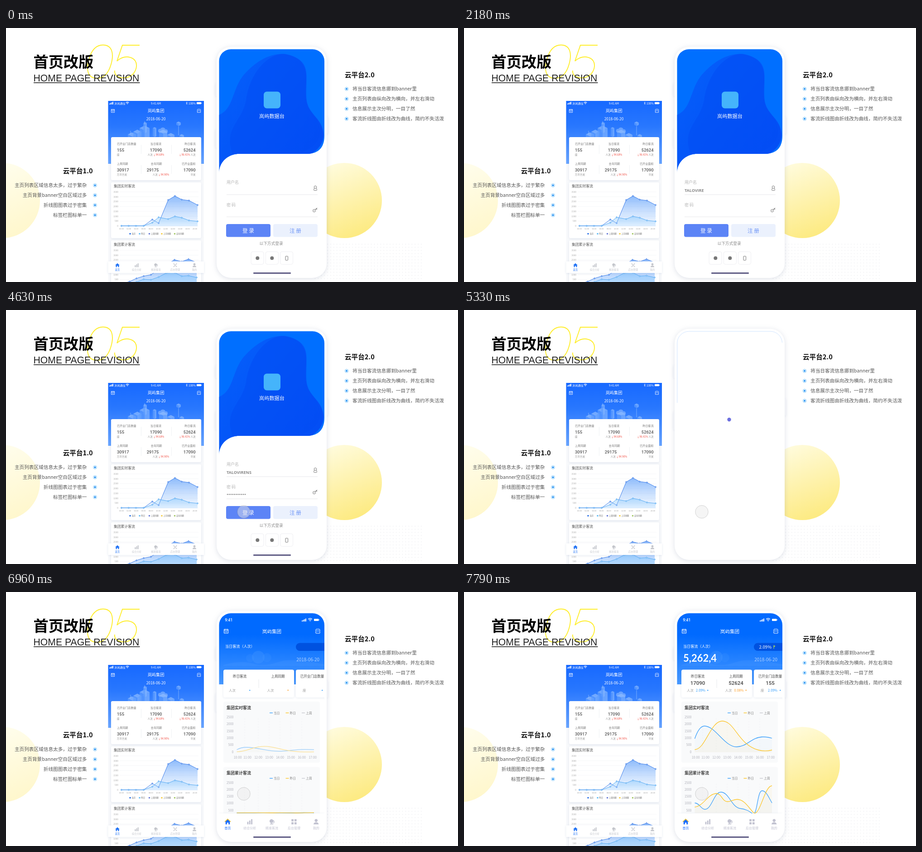
An HTML page that plays this animation: 998x561 px, repeating every 7990 ms.

```html
<!DOCTYPE html>
<html lang="zh">
<head>
<meta charset="utf-8">
<style>
html, body { margin: 0; width: 100%; height: 100%; overflow: hidden; background: #fff; }
svg { display: block; width: 100vw; height: 100vh; }
text { font-family: "Noto Sans CJK SC", "Noto Sans CJK", "Noto Sans", sans-serif; white-space: pre; text-spacing-trim: space-all; }
text[font-weight="500"] { font-family: Roboto, "Noto Sans CJK SC", sans-serif; }
.shade { filter: drop-shadow(0 1px 2.5px rgba(60, 90, 150, .12)); }
.grow path { vector-effect: non-scaling-stroke; }
</style>
</head>
<body>
<svg id="stage" viewBox="0 0 998 561" preserveAspectRatio="none">
<defs>
  <linearGradient id="sun" x1=".25" y1="0" x2=".65" y2="1"><stop stop-color="#fffce0"/><stop offset="1" stop-color="#fdea80"/></linearGradient>
  <linearGradient id="paleSun" x1=".25" y1="0" x2=".65" y2="1"><stop stop-color="#fffef0"/><stop offset="1" stop-color="#fff7cc"/></linearGradient>
  <linearGradient id="oldTop" x2="0" y2="1"><stop stop-color="#1769ff"/><stop offset=".4" stop-color="#2877fe"/><stop offset="1" stop-color="#69a5ff"/></linearGradient>
  <linearGradient id="newTop" x2="0" y2="1"><stop offset=".3" stop-color="#006aff"/><stop offset="1" stop-color="#4798ff"/></linearGradient>
  <linearGradient id="blob" x2="1" y2="1"><stop stop-color="#0560fb"/><stop offset="1" stop-color="#034bf4"/></linearGradient>
  <linearGradient id="area" x2="0" y2="1"><stop stop-color="#3f8cf8" stop-opacity=".6"/><stop offset="1" stop-color="#8fc0ff" stop-opacity=".12"/></linearGradient>
  <linearGradient id="area2" x2="0" y2="1"><stop stop-color="#6cbcfb" stop-opacity=".4"/><stop offset="1" stop-color="#b5dcff" stop-opacity=".3"/></linearGradient>
  <pattern id="dots" x="679" y="474" width="6.9" height="6.9" patternUnits="userSpaceOnUse"><circle cx="3.4" cy="3.4" r=".75" fill="#e2e3e8"/></pattern>
  <clipPath id="screen"><rect x="470.5" y="47" width="232.5" height="497" rx="26"/></clipPath>
  <clipPath id="blueShape"><path d="M470 47H703V238Q703 278 663 278H515C490 278 470.500 296 470.500 320Z"/></clipPath>
  <clipPath id="plot"><rect x="470" y="380" width="233" height="109"/></clipPath>
</defs>
</svg>
<script>
const stage = document.getElementById('stage');

// y is the middle of the line
const text = (x, y, s, size, fill = '#333', anchor = 'start', weight = 400, extra = '') =>
  `<text x="${x}" y="${y + size * .37}" font-size="${size}" fill="${fill}" text-anchor="${anchor}" font-weight="${weight}" ${extra}>${s}</text>`;
const mid = (x, y, s, size, fill, weight) => text(x, y, s, size, fill, 'middle', weight);
const end = (x, y, s, size, fill, weight) => text(x, y, s, size, fill, 'end', weight);
const rect = (x, y, w, h, fill, r = 0, extra = '') =>
  `<rect x="${x}" y="${y}" width="${w}" height="${h}" rx="${r}" fill="${fill}" ${extra}/>`;
const circle = (x, y, r, fill, extra = '') => `<circle cx="${x}" cy="${y}" r="${r}" fill="${fill}" ${extra}/>`;
const line = (d, color, w = 1, extra = '') => `<path d="${d}" fill="none" stroke="${color}" stroke-width="${w}" ${extra}/>`;
const fill = (d, color, extra = '') => `<path d="${d}" fill="${color}" ${extra}/>`;
const at = (x, y, s, body) => `<g transform="translate(${x} ${y}) scale(${s})">${body}</g>`;
const each = (list, f) => list.map(f).join('');

const bullet = (x, y) => circle(x, y, 3.8, '#f2faff', 'stroke="#7cc4f8" stroke-width=".9"') + circle(x, y, 2, '#2490f2');
const calendar = (x, y, s) => at(x, y, s, line('M-4.500-4H4.500V4.500H-4.500ZM-4.500-1.500H4.500M-2.500 1.500H2.500M-2.500-5V-3M2.500-5V-3', '#fff'));
const shop = (x, y, s) => at(x, y, s, line('M-3.500-4.500H3.500L5-1.500Q3.300 1 1.700-1Q0 1-1.700-1Q-3.300 1-5-1.500ZM-4.500 0V4.500H4.500V0', '#fff'));
const status = (x, y, s) => at(x, y, s, each([0, 1, 2, 3], i => rect(i * 3, 1 - i * 1.6, 2, 2.5 + i * 1.6, '#fff')));
const wifi = (x, y, s) => at(x, y, s, line('M-4.500-1.500Q0-5.500 4.500-1.500M-2.700.6Q0-1.900 2.700.6', '#fff', 1.4) + circle(0, 2.3, 1, '#fff'));
const battery = (x, y, s) => at(x, y, s, rect(0, -2.5, 11, 5, '#fff', 1) + rect(11.5, -1, 1, 2, '#fff'));

const tabNames = ['首页', '综合分析', '精准客流', '后台管理', '我的'];
const tabIcons = [
  'M-7 0L0-6.500L7 0H5V6H1.800V2H-1.800V6H-5V0Z',
  'M-6 0h3v6h-3zM-1.500-3h3v9h-3zM3-6h3v12h-3z',
  'M-1-6a4.500 4.500 0 1 0 .1 0zM-5 6Q-1 1 4 6ZM4-4Q8 0 4 4L3 3Q6 0 3-3Z',
  'M-6-6h5v5h-5zM1-6h5v5h-5zM-6 1h5v5h-5zM1 1h5v5h-5z',
  'M0-6.500a3.500 3.500 0 1 0 .1 0zM-6 6Q-5.500 1 0 1Q5.500 1 6 6Z'];
const crossTools = 'M-6-5l1.500-1.500L6 4.500L4.500 6ZM6-5L4.500-6.500L-6 4.500L-4.500 6Z';
const tabs = (x, step, y, s, labelY, size, active, idle, icons) => each(tabNames, (name, i) =>
  at(x + i * step, y, s, fill(icons[i], i ? idle : active)) +
  mid(x + i * step, labelY, name, size, i ? idle : active));

// ---------- backdrop ----------
const backdrop =
  circle(747, 381, 83, 'url(#sun)') + circle(-8, 381, 83, 'url(#paleSun)') +
  rect(679, 474, 244, 85, 'url(#dots)') +
  line('M214 37.500C234 37.500 239 56 232 80C226 101 215 111 201 111C181 111 176 94 183 69C189 48 199 37.500 214 37.500ZM295 38H257L245 73C252 66 262 63 270 64C284 66 291 76 287 90C283 104 270 111 257 110C246 109 239 103 240 94', '#ffee2e', 1.9) +
  text(60.5, 74.5, '首页改版', 33.2, '#000', 'start', 700) +
  `<text x="60.500" y="117.500" font-size="21.200" fill="#222" style="font-family:'Liberation Sans',sans-serif">HOME PAGE REVISION</text>` +
  rect(61, 120, 234.5, 1.6, '#222') +
  text(748, 103.5, '云平台2.0', 14.6, '#111', 'start', 700) +
  each(['将当日客流信息挪到banner里', '主页列表由纵向改为横向，并左右滑动', '信息展示主次分明，一目了然', '客流折线图由折线改为曲线，简约不失活泼'],
    (s, i) => bullet(752, 134.5 + i * 22) + text(765, 134.5 + i * 22, s, 10.65, '#555')) +
  end(191.5, 316, '云平台1.0', 14.6, '#111', 700) +
  each(['主页列表区域信息太多，过于繁杂', '主页背景banner空白区域过多', '折线图图表过于密集', '标签栏图标单一'],
    (s, i) => bullet(196.5, 347.5 + i * 21.9) + end(178.5, 347.5 + i * 21.9, s, 10.65, '#555'));

// ---------- old home page ----------
const block = ([x, y, w, h]) =>
  fill(`M${x} ${y}l${w} ${-w / 2}l${w} ${w / 2}l${-w} ${w / 2}z`, '#9cc6ff', 'opacity=".6"') +
  fill(`M${x} ${y}l${w} ${w / 2}v${h}l${-w} ${-w / 2}z`, '#5d9dff', 'opacity=".7"') +
  fill(`M${x + w} ${y + w / 2}l${w} ${-w / 2}v${h}l${-w} ${w / 2}z`, '#7eb2ff', 'opacity=".7"');
const stat = (x, y, anchor, label, n, unit, pct = '') =>
  text(x, y, label, 6.1, '#777', anchor) + text(x, y + 14, n, 9.4, '#555', anchor, 500) +
  text(x, y + 24, unit + (pct && ` <tspan fill="#f04a3e">↓${pct}</tspan>`), 5.5, '#888', anchor);
const series = (xs, ys, color, floor, area) => {
  const d = 'M' + xs.map((x, i) => x + ' ' + ys[i]).join('L');
  return fill(`${d}V${floor}H${xs[0]}Z`, `url(#${area})`) + line(d, color, .9) +
    each(xs, (x, i) => circle(x, ys[i], 1.3, '#fff', `stroke="${color}"`));
};
const xs = [255, 271, 287, 304, 323, 337, 358, 373, 388, 404, 423];
const oldGrid = y0 => each([3500, 3000, 2500, 2000, 1500, 1000, 500, 0], (n, i) =>
  end(248, y0 + i * 10.75, n, 4.8, '#aaa') + line(`M251 ${y0 + i * 10.75}H425`, '#eceef2', .5));
const oldHome =
  rect(225.5, 161, 211.5, 400, '#f8f9fb') + rect(225.5, 161, 211.5, 139, 'url(#oldTop)') +
  each([[269, 235, 9, 12], [281, 229, 9, 14], [295, 221, 11, 22], [303, 210, 4, 20], [324, 221, 4, 18], [338, 229, 9, 12], [356, 236, 8, 9], [383, 237, 5, 6], [376, 209, 5, 5]], block) +
  fill('M339 231a4 4 0 0 1 2-8a6 6 0 0 1 11 1a4 4 0 0 1 2 8z', '#8fbdff', 'opacity=".6"') +
  line('M381 217V237M275 227V235M306 206V214', '#9cc6ff', .7) +
  status(228, 166, .8) + text(239, 166.5, '沐岚通信', 6.2, '#fff') + wifi(268, 166, .75) +
  mid(331, 166.5, '9:41 AM', 6.2, '#fff') + line('M397.500 164.500l3 3l-1.500 1.500v-6l1.500 1.500l-3 3', '#fff', .6) +
  end(419, 166.5, '100%', 6.2, '#fff') + battery(421, 166, .9) +
  calendar(236, 183, .8) + shop(426, 183, .8) + mid(331, 183, '岚屿集团', 9.2, '#fff') +
  mid(331, 200.5, '2018-06-20', 8.3, '#fff') +
  rect(232, 241, 199, 95, '#fff', 3, 'class="shade"') +
  stat(245, 255.5, 'start', '已开业门店数量', '155', '座') + stat(331, 255.5, 'middle', '当日客流', '17090', '人次', '94.68%') +
  stat(418.5, 255.5, 'end', '昨日客流', '52624', '<tspan fill="#f04a3e">↓96.41%</tspan> 人次') +
  stat(245, 300, 'start', '上周同期', '30917', '万平方米') +
  mid(332, 300, '去年同期', 6.1, '#777') + mid(324, 314, '29175', 9.4, '#555', 500) +
  mid(342, 324, '人次 <tspan fill="#f04a3e">↓94.90%</tspan>', 5.5, '#888') +
  stat(418.5, 300, 'end', '已开业面积', '17090', '平米') +
  line('M298.500 258V278M365.500 258V278M298.500 303V322M365.500 303V322', '#e9ebef', .7) +
  rect(232, 341, 199, 123, '#fff', 3, 'class="shade"') + text(238, 349.5, '集团实时客流', 7.8, '#555') + oldGrid(362) +
  series(xs, [437, 437, 437, 437, 423, 431, 380, 371, 379, 381, 391], '#2f74e8', 438, 'area') +
  series(xs, [437, 437, 437, 437, 430, 418, 422, 416, 419, 425, 427], '#4ea6f2', 438, 'area2') +
  each(xs, (x, i) => mid(255 + i * 16.2, 443.5, String(i * 2).padStart(2, '0') + ':00', 4, '#999')) +
  each([[274, '当月', '#2f74e8'], [295, '昨日', '#63bdf5'], [316.5, '上周同期', '#6c7fd8'], [344, '上月同期', '#f6cf4a'], [372.5, '去年同期', '#a6c96a']],
    ([x, s, c]) => circle(x, 454.5, 1.8, c) + text(x + 3.5, 454.5, s, 4.2, '#666')) +
  rect(232, 469, 199, 95, '#fff', 3, 'class="shade"') + text(238, 478.5, '集团累计客流', 7.8, '#555') + oldGrid(491) +
  series([250, 273, 288, 304, 320, 337, 358, 372, 388, 403, 421], [566, 560, 553, 548, 545, 533, 520, 512, 516, 510.5, 518], '#2f74e8', 600, 'area') +
  series([273, 288, 304, 320, 337, 354, 372, 388, 403, 421], [566, 561, 555, 556, 550, 541, 540, 548, 547, 551], '#4ea6f2', 600, 'area2') +
  rect(225.5, 515.5, 211.5, 25.5, '#fff', 0, 'class="shade"') +
  tabs(246, 42.5, 524, .7, 534, 5.2, '#2173f5', '#c4c6cc', tabIcons.with(3, crossTools));

// ---------- phone ----------
const phone =
  rect(462.5, 122, 4, 28, '#fdfdfe', 1, 'class="shade"') + rect(462.5, 224, 4, 40, '#fdfdfe', 1, 'class="shade"') +
  rect(707, 196, 4, 37, '#fdfdfe', 1, 'class="shade"') +
  rect(465, 41.5, 243, 510.5, '#fff', 32, 'style="filter:drop-shadow(0 2px 6px rgba(70,90,130,.18))"') +
  line('M470.700 205V73A26 26 0 0 1 496.500 47.200H677A26 26 0 0 1 702.500 72', '#bcd8ff', .7);
const bar = rect(546, 540, 83, 2.7, '#504d7a', 1.3);

const login = `<g id="login" clip-path="url(#screen)">` + rect(470, 47, 233, 497, '#fff') +
  `<g clip-path="url(#blueShape)">` + rect(470, 47, 233, 275, '#006fff') +
  fill('M470 192C505 178 498 130 530 98C562 64 605 44 645 68C682 92 648 140 670 178C680 196 694 202 700 226C706 250 690 270 670 280L470 325Z', 'url(#blob)') +
  fill('M500 278C480 220 520 210 530 160C540 90 585 55 615 57C690 70 650 140 669 178C690 205 700 220 690 246C680 265 660 272 640 280Z', '#024ef5', 'opacity=".55"') + '</g>' +
  rect(569, 140.5, 37, 37, '#45b4fb', 7) + mid(587, 195, '岚屿数据台', 11.2, '#fff') +
  text(487, 341, '用户名', 9, '#b4b4b4') + text(487, 390.5, '密 码', 9, '#b4b4b4') +
  line('M487 368H688M487 417H688', '#e7e7ea') +
  circle(683, 351.5, 2.8, 'none', 'stroke="#777"') + line('M680.800 353.500Q678.500 358.800 680.500 358.800H685.500Q687.500 358.800 685.200 353.500', '#777') +
  circle(680.5, 403.5, 3, 'none', 'stroke="#777"') + circle(680.5, 403.5, .8, '#777') + line('M682.700 401.300L687 397.500M685 399.300l1.800 1.800', '#777', 1.2) +
  `<text id="user" x="487" y="361.700" font-size="9" font-weight="700" fill="#888" style="font-family:'Open Sans',sans-serif"></text><g id="pass">` +
  each([...Array(11)], (_, i) => circle(489 + i * 3.9, 407.3, 1.2, '#888')) + '</g>' +
  rect(486, 433, 98, 28.5, '#5c84f6', 4) + mid(535, 447.8, '登 录', 11.6, '#fff') +
  rect(590, 433, 98, 28.5, '#ebf1fd', 4) + mid(639, 447.8, '注 册', 11.6, '#6a92f6') +
  mid(585.5, 475.5, '以下方式登录', 8.7, '#8a8a8a') +
  each([541, 573.3, 605.6], x => rect(x, 494, 28, 28, '#fff', 4, 'stroke="#eeeef2"')) +
  circle(555.3, 508.3, 4, '#777') + circle(587.3, 508.3, 4, '#777') + rect(617, 504, 5.5, 9, 'none', 1, 'stroke="#777"') + bar + '</g>';

// ---------- new home page ----------
const typed = []; // [id, string, duration]
const typing = (x, y, s, size, color, anchor, weight, ms = 700, extra = '') => {
  typed.push(['k' + typed.length, s, ms]);
  return text(x, y, '', size, color, anchor, weight, `id="k${typed.length - 1}" ${extra}`);
};
const metric = (x, y, label, n, unit, unitX, pct, color, up, ms) =>
  mid(x, y, label, 7.5, '#444') + typing(x, y + 15, n, 11.5, '#444', 'middle', 500, ms) +
  text(unitX, y + 31, unit, 7.4, '#999') + typing(unitX + (unit.length > 1 ? 20 : 16), y + 31, pct, 7.4, color, 'start', 400, ms) +
  fill(`M${unitX + (unit.length > 1 ? 44.5 : 41.5)} ${y + 31 + up}l1.700 ${-2.5 * up}l1.700 ${2.5 * up}z`, color);
const curves = (id, floor, blue, gold) => `<g id="${id}" class="grow">` +
  fill(`${blue}V${floor}H509.500Z`, '#3da3ff', 'opacity=".03"') + fill(`${gold}V${floor}H509.500Z`, '#ffc928', 'opacity=".05"') +
  line(blue, '#3fa2fc', 1.3) + line(gold, '#fdc62c', 1.3) + '</g>';
const chart = (y, title) => rect(480, y, 213, 135, '#f9fafb', 4) + text(487, y + 13.3, title, 9, '#444', 'start', 700) +
  each([['当日', '#3fa2fc'], ['昨日', '#fdc62c'], ['上周', '#c9cad2']], ([s, c], i) =>
    line(`M${582 + i * 35.5} ${y + 25}h7`, c, 1.4) + text(591 + i * 35.5, y + 25, s, 6.8, '#888')) +
  each([2500, 2000, 1500, 1000, 500, 0], (n, i) => end(502.5, y + 34.5 + i * 15.3, n, 7, '#b0b1ba')) +
  line(each([527, 557, 581, 605, 629, 653], x => `M${x} ${y + 37}v73`), '#eceef2', .6, 'stroke-dasharray="3 3"') +
  each([0, 1, 2, 3, 4, 5, 6, 7], i => mid(i ? 509 + i * 24 : 511.5, y + 123, 10 + i + ':00', 7.1, '#b0b1ba'));

const home = `<g id="home" clip-path="url(#screen)">` + rect(470, 47, 233, 497, '#fff') + rect(470, 47, 233, 157, 'url(#newTop)') +
  fill('M480 161Q520 150 545 158T600 155T703 160V163H480Z', '#fff', 'opacity=".04"') +
  circle(557, 144, 14, '#4d9bff', 'opacity=".28"') + circle(539, 146, 9, '#4d9bff', 'opacity=".14"') + circle(576, 145, 10, '#4d9bff', 'opacity=".16"') +
  text(483.5, 61.5, '9:41', 8.5, '#fff', 'start', 500) + status(653, 62, .9) + wifi(671.5, 61.5, .95) + battery(680, 61.5, .95) +
  calendar(486, 86.5, 1) + shop(688.5, 86.5, 1) + mid(587, 87, '岚屿集团', 10.6, '#fff') +
  text(484, 120, '当日客流（人次）', 8.1, '#fff') + rect(640, 112.5, 80, 17.5, '#0052e0', 8.7) +
  typing(651.5, 121.3, '2.09%', 9.6, '#fff', 'start', 400) +
  `<g id="flag">` + fill('M683.500 117.500l4 2l-3 2v4h-1z', '#b6e34a') + '</g>' +
  typing(484, 145.5, '5,262,4', 22, '#fff', 'start', 700, 700, `style="font-family:Lato,sans-serif"`) +
  end(692, 149.5, '2018-06-20', 9.9, '#b5d4ff') +
  rect(480, 171.5, 156, 61.5, '#fff', 4, 'class="shade"') + rect(640, 171.5, 80, 61.5, '#fff', 4, 'class="shade"') +
  metric(516, 186, '昨日客流', '17090', '人次', 492, '2.09%', '#2f9bfa', 1) +
  metric(600.5, 186, '上周同期', '52624', '人次', 576.5, '0.08%', '#fb9f2b', -1, 830) +
  metric(676, 186, '已开业门店数量', '155', '座', 655, '2.09%', '#2f9bfa', 1, 830) + line('M558 193V212', '#e3e4e8', .8) +
  chart(242, '集团实时客流') +
  curves('grow1', 354, 'M509.500 324C517 302 524 296 531 296C555 296 575 342 602 342C625 342 635 320 660 320C668 320 674 321 680 323',
    'M509.500 348C533 348 544 285 570 285C598 285 605 337 650 349C662 352 672 351 680 349') +
  chart(386.5, '集团累计客流') + `<g clip-path="url(#plot)">` +
  curves('grow2', 488, 'M509.500 466C520 466 523 480 532 480C547 480 552 442 567 442C585 442 590 474 609 478C622 479 630 484 639 491C648 488 648 439 658 439C667 439 672 452 680 466',
    'M509.500 475C530 472 538 446 557 445C569 445 570 463 582 463C590 463 594 458 603 458C620 458 630 479 641 489C655 489 664 428 680 428') + '</g>' +
  rect(470, 489, 233, 55, '#fff', 0, 'class="shade"') + tabs(489.5, 48.8, 507.5, .95, 521, 7, '#1a6dff', '#c1c2d0', tabIcons) +
  line('M483 507.500L489.500 501.500L496 507.500', '#fcc530', 1.6) + bar + '</g>';

stage.insertAdjacentHTML('beforeend', backdrop + oldHome + phone + home + login +
  circle(585.5, 242, 4.2, '#6d70df', 'id="dot"') +
  circle(0, 0, 14.2, 'rgba(233,233,233,.45)', 'id="touch" stroke="rgba(110,110,110,.35)" stroke-width=".8"'));

// ---------- motion ----------
const $ = id => document.getElementById(id);
const LOOP = 7990, STEP = 70;
const clamp = v => Math.max(0, Math.min(1, v));
// progress of a span, in film steps
const span = (t, from, ms) => clamp(Math.floor((t - from) / STEP + .001) * STEP / ms);
const bezier = (p, u) => [0, 1].map(i => {
  const v = 1 - u;
  return v ** 3 * p[0][i] + 3 * v * v * u * p[1][i] + 3 * v * u * u * p[2][i] + u ** 3 * p[3][i];
});
const easeOut = p => 1 - (1 - p) ** 2;
const easeInOut = p => p * p * (3 - 2 * p);
const show = (id, on) => $(id).style.display = on ? '' : 'none';

const moves = [
  { from: 570, ms: 910, fade: 1910, path: [[650, 97], [650, 300], [570, 405], [517, 360]] },
  { from: 2680, ms: 490, fade: 3440, path: [[517, 360], [600, 455], [560, 480], [519, 409]] },
  { from: 4080, ms: 490, fade: 1e5, path: [[519, 409], [521, 421], [523, 434], [525, 445.8]] }];

function draw(t) {
  const move = moves.findLast(m => t >= m.from);
  show('touch', move);
  if (move) {
    const [x, y] = bezier(move.path, easeOut(span(t, move.from, move.ms)));
    $('touch').setAttribute('transform', `translate(${x} ${y})`);
    $('touch').style.opacity = 1 - span(t, move.fade - STEP, 280);
  }
  $('user').textContent = 'TALOVIRENS'.slice(0, Math.round(10 * span(t, 1910 - STEP, 350)));
  const shown = Math.round(11 * span(t, 3440 - STEP, 280));
  [...$('pass').children].forEach((c, i) => c.style.display = i < shown ? '' : 'none');

  show('login', t < 4840);
  $('login').style.opacity = 1 - span(t, 4630, 210);

  // the dot makes two turns, rests, and makes two more
  show('dot', t >= 4910 && t < 6960);
  const turn = 720 * (t < 6000 ? easeInOut(span(t, 4910, 840)) : easeInOut(span(t, 6050, 840)));
  $('dot').setAttribute('transform', `rotate(${turn} 585.500 253.200)`);

  show('home', t >= 6960);
  const rise = easeOut(span(t, 6960, 700));
  const grow = (id, floor, low) => {
    const s = low + (1 - low) * rise;
    $(id).setAttribute('transform', `translate(0 ${floor * (1 - s)}) scale(1 ${s})`);
  };
  grow('grow1', 354, .19);
  grow('grow2', 488, .01);
  $('grow1').style.opacity = .5 + .5 * rise;
  for (const [id, s, ms] of typed) $(id).textContent = s.slice(0, Math.floor(s.length * clamp((t - 6960) / ms) + .01));
  show('flag', t >= 7660);
}

const start = performance.now();
function tick() {
  draw((performance.now() - start) % LOOP);
  requestAnimationFrame(tick);
}
tick();
</script>
</body>
</html>
```
